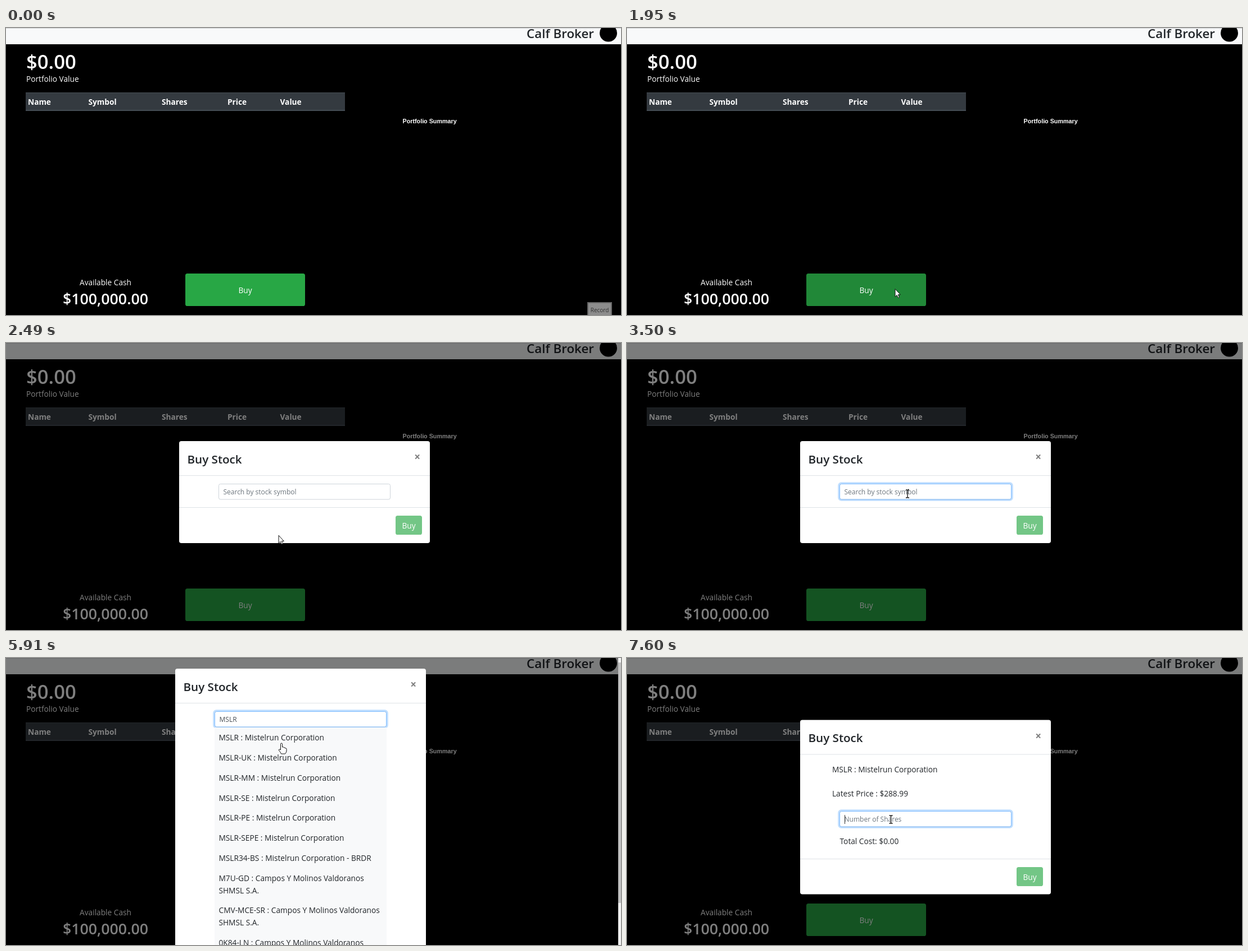
Animation, 1094 px wide and 512 px high, one loop 8 s. Source, as an HTML page with a canvas:

```html
<!DOCTYPE html>
<html lang="en">
<head>
<meta charset="utf-8">
<title>Stock trading demo</title>
<style>
  html, body { margin: 0; width: 100%; height: 100%; overflow: hidden; background: #000; }
  canvas { display: block; width: 1094px; height: 512px; }
</style>
</head>
<body>
<canvas id="stage"></canvas>
<script>
const W = 1094, H = 512, LOOP = 8000;
const canvas = document.getElementById('stage');
const ctx = canvas.getContext('2d');
const dpr = window.devicePixelRatio || 1;
canvas.width = W * dpr;
canvas.height = H * dpr;

const SANS = '"Open Sans", "Noto Sans", sans-serif';
const BODY = '13.7px ' + SANS;
const SMALL = '12px ' + SANS;
const semi = size => `600 ${size}px ${SANS}`;
const bold = size => `700 ${size}px ${SANS}`;
const INK = '#212529', WHITE = '#fff';

const clamp = v => Math.max(0, Math.min(1, v));
const ramp = (t, start, length) => clamp((t - start) / length);
const smooth = p => p * p * (3 - 2 * p);

// Cubic Bézier ease-out (0, 0, .58, 1), solved by bisection.
function easeOut(p) {
  let lo = 0, hi = 1;
  for (let i = 0; i < 20; i++) {
    const u = (lo + hi) / 2;
    if (3 * .58 * u * u * (1 - u) + u * u * u < p) lo = u; else hi = u;
  }
  return lo * lo * (3 - 2 * lo);
}

function rect(x, y, w, h, color) {
  ctx.fillStyle = color;
  ctx.fillRect(x, y, w, h);
}

function round(x, y, w, h, r, fill, stroke, width = 1) {
  ctx.beginPath();
  ctx.roundRect(x, y, w, h, r);
  if (fill) { ctx.fillStyle = fill; ctx.fill(); }
  if (stroke) { ctx.strokeStyle = stroke; ctx.lineWidth = width; ctx.stroke(); }
}

function text(s, x, y, font = BODY, color = INK, align = 'left') {
  ctx.font = font;
  ctx.fillStyle = color;
  ctx.textAlign = align;
  ctx.fillText(s, x, y);
}

// Search results: each entry is an array of lines.
const NAME = 'Mistelrun Corporation';
const listing = suffix => [`MSLR${suffix} : ${NAME}`];
const COPPER = ['MSKO1-IE : Arvo National Pewter Industries', 'Co.,'];
const FUND = ['M7U-GD : Campos Y Molinos Valdoranos', 'SHMSL S.A.'];
const MARKETS = ['CMV-MCE-SR : Campos Y Molinos Valdoranos', 'SHMSL S.A.'];
const LONDON = ['0K84-LN : Campos Y Molinos Valdoranos', 'SHMSL S.A.'];
const monteluz = cls =>
  [`MVQ.${cls}-VS : Monteluz Negocios Financieros`, `C.A. - Class ${cls}`];

const RESULTS = {
  m: [
    ['M : Wode`s Inc'], COPPER, listing(''), monteluz('A'), monteluz('B'),
    ['MADR1-IE : Marble & Feldspar Development', 'Inves'],
    ['MAPV1-IE : Arvo Water Plant Projects', 'Managements Co.(MAPVO)'],
    ['MZ : Maplequill Incorporated - Class A']
  ],
  ms: [
    COPPER, listing(''), listing('-UK'), listing('-MM'), listing('-SE'),
    listing('-PE'), FUND, MARKETS, LONDON
  ],
  full: [
    ...['', '-UK', '-MM', '-SE', '-PE', '-SEPE'].map(listing),
    [`MSLR34-BS : ${NAME} - BRDR`], FUND, MARKETS, LONDON
  ]
};

function drawPage(t, hover) {
  rect(0, 0, W, H, '#000');
  rect(0, 0, W, 29, '#f8f9fa');
  rect(0, 0, W, 1, '#d0d2d4');
  text('Calf Broker', 1046, 18, semi(22.4), INK, 'right');
  ctx.beginPath();
  ctx.arc(1071.5, 9, 15.5, 0, Math.PI * 2);
  ctx.fillStyle = '#000';
  ctx.fill();

  text('$0.00', 36, 73, semi(34.7), WHITE);
  text('Portfolio Value', 36, 96, BODY, WHITE);
  rect(35, 115, 568, 33, '#343a40');
  rect(35, 115, 568, 1, '#454d55');
  rect(35, 146, 568, 2, '#454d55');
  const columns = { Name: 39, Symbol: 146.5, Shares: 277, Price: 394, Value: 487.5 };
  for (const [label, x] of Object.entries(columns)) text(label, x, 137, bold(13.7), WHITE);
  text('Portfolio Summary', 705.5, 170,
    'bold 10.76px "Liberation Sans", Arial, sans-serif', WHITE);

  text('Available Cash', 177, 459, BODY, WHITE, 'center');
  text('$100,000.00', 177, 492.5, semi(26.8), WHITE, 'center');
  const mix = (a, b) => Math.round(a + (b - a) * hover);
  round(319, 438, 213, 58, 3.6, `rgb(${mix(40, 33)},${mix(167, 136)},${mix(69, 56)})`);
  text('Buy', 425.5, 473, BODY, WHITE, 'center');

  if (t < 70) {
    round(1035, 490, 42, 30, 0, '#8c8c8c', '#666', 2);
    text('Record', 1056, 507, '10px ' + SANS, '#333', 'center');
  }
}

function drawInput(x, y, focus, value, placeholder, caret) {
  const alpha = ctx.globalAlpha;
  if (focus) round(x - 1.3, y - 1.3, 308.6, 30.6, 4.5, null, `rgba(0,123,255,${.25 * focus})`, 3);
  round(x + .5, y + .5, 305, 27.5, 3, WHITE, '#ced4da');
  if (focus) {
    ctx.globalAlpha = alpha * focus;
    round(x + .5, y + .5, 305, 27.5, 3, null, '#80bdff');
    ctx.globalAlpha = alpha;
  }
  text(value || placeholder, x + 8.5, y + 19.3, SMALL, value ? '#495057' : '#6c757d');
  if (caret) {
    const end = value ? ctx.measureText(value).width : 0;
    rect(Math.round(x + 8.5 + end), y + 7, 1, 16, '#333');
  }
}

function drawModal(x, y, h) {
  round(x, y, 446, h, 4, WHITE);
  text('Buy Stock', x + 14.5, y + 39.5, semi(20.6));
  text('×', x + 423.7, y + 35, bold(19), 'rgba(0,0,0,.5)', 'center');
  rect(x, y + 61, 446, 1, '#dee2e6');
}

function drawFooter(x, y) {
  rect(x, y, 446, 1, '#dee2e6');
  round(x + 385, y + 15, 47, 34, 3.6, '#73c686');
  text('Buy', x + 408.5, y + 37.5, BODY, WHITE, 'center');
}

function drawSearch(t) {
  const y = 175 - 44.8 * (1 - easeOut(ramp(t, 1980, 300)));
  ctx.globalAlpha = ramp(t, 1980, 150);
  drawModal(308, y, 182);
  const caret = t >= 2970 && t < 3500 || t >= 3830;
  drawInput(378, y + 76, ramp(t, 2970, 150), t >= 3830 ? 'M' : '', 'Search by stock symbol', caret);
  drawFooter(308, y + 118);
  ctx.globalAlpha = 1;
}

function drawResults(t) {
  const value = t < 4770 ? 'MS' : t < 5110 ? 'MSL' : 'MSLR';
  const items = t < 4770 ? RESULTS.m : t < 5510 ? RESULTS.ms : RESULTS.full;
  drawModal(301, 19, 520);
  drawInput(371, 95, 1 - ramp(t, 6180, 150), value, '', t < 5640);
  rect(371, 124, 306, 388, '#f8f9fa');
  let y = 147;
  for (const lines of items) {
    for (const line of lines) {
      text(line, 378.5, y);
      y += 21.52;
    }
    y += 14.34;
  }
  rect(1089, 0, 5, H, '#f1f1f1');
  rect(1089, 8, 5, t < 4770 ? 391 : 429, '#c1c1c1');
}

function drawOrder(t) {
  drawModal(308, 110.5, 311);
  text(`MSLR : ${NAME}`, 365, 203.5);
  text('Latest Price : $288.99', 365, 246.5);
  drawInput(378, 273, ramp(t, 7450, 150), '', 'Number of Shares', t >= 7450);
  text('Total Cost: $0.00', 378.5, 332);
  drawFooter(308, 358);
}

// Pointer path: time, x, y.
const PATH = [
  [620, 1038, 507], [760, 1060, 499], [1010, 1060, 499], [1620, 480, 464],
  [1810, 480, 464], [1950, 476.5, 465], [2150, 476.5, 465], [2490, 484.5, 343],
  [2570, 487, 322], [2900, 499, 269], [5510, 499, 269], [5900, 490.5, 152],
  [6590, 490.5, 152], [7230, 469.5, 288]
];
const EASED = new Set([1010, 5510, 6590]);

function pointerAt(t) {
  const next = PATH.findIndex(k => k[0] > t);
  if (next < 0) return PATH[PATH.length - 1].slice(1);
  const [t0, x0, y0] = PATH[next - 1], [t1, x1, y1] = PATH[next];
  let p = (t - t0) / (t1 - t0);
  if (EASED.has(t0)) p = smooth(p);
  return [x0 + (x1 - x0) * p, y0 + (y1 - y0) * p];
}

const ARROW = new Path2D('M.5 .5V14.5L3.6 11.6 5.8 16.4 7.9 15.4 5.8 10.7H9.8Z');
const HAND = new Path2D('M-2 9V1.5Q-2 0-.5 0Q1 0 1 1.5V7Q3.5 6 4 8Q6 7.2 6.5 9' +
  'Q8.5 8.5 8.5 10.5V14Q8 17 6 19H-1Q-2 16-4.5 13.5Q-6 11.5-4.5 10.8Q-3 10.8-2 12Z');
const IBEAM = new Path2D('M-3-7H-1L0-6 1-7H3M0-6V6M-3 7H-1L0 6 1 7H3');

function drawPointer(t, [x, y]) {
  ctx.save();
  ctx.translate(x, y);
  const onField = t >= 2840 && t < 4250 || t >= 6590 && y > 273;
  const shape = onField ? IBEAM : t >= 4250 && t < 6590 ? HAND : ARROW;
  if (!onField) { ctx.fillStyle = WHITE; ctx.fill(shape); }
  ctx.strokeStyle = '#111';
  ctx.lineWidth = onField ? 1.3 : 1;
  ctx.stroke(shape);
  ctx.restore();
}

function draw(t) {
  ctx.setTransform(dpr, 0, 0, dpr, 0, 0);
  const pointer = t >= 620 ? pointerAt(t) : null;
  const hover = ramp(t, 1400, 150) * (1 - ramp(t, 2130, 150));
  drawPage(t, t < 1980 ? hover : 1 - ramp(t, 2130, 150));
  rect(0, 0, W, H, `rgba(0,0,0,${.5 * ramp(t, 1980, 150)})`);
  if (t >= 6590) drawOrder(t);
  else if (t >= 4250) drawResults(t);
  else if (t >= 1980) drawSearch(t);
  if (pointer) drawPointer(t, pointer);
}

const start = performance.now();
function frame() {
  draw((performance.now() - start) % LOOP);
  requestAnimationFrame(frame);
}
frame();
</script>
</body>
</html>
```
